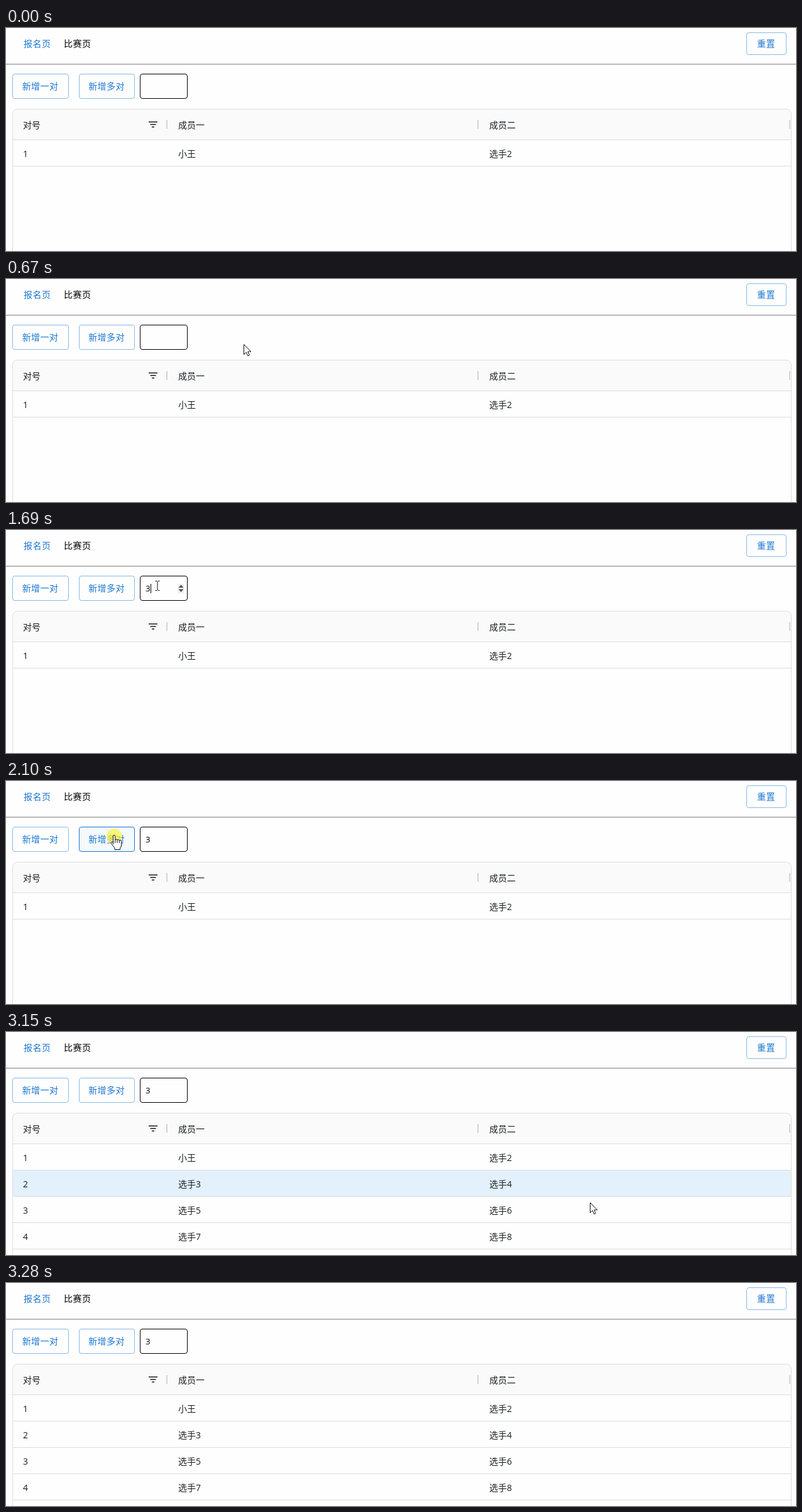
An HTML page for the animation above (3810 ms loop, 1257 by 356 pixels).

```html
<!DOCTYPE html>
<html lang="zh-CN">
<head>
<meta charset="utf-8">
<style>
  html, body { margin: 0; width: 100%; height: 100%; overflow: hidden; background: #fefefe; }
  svg { display: block; font: 14px "Open Sans", "Noto Sans CJK SC", "Noto Sans CJK", sans-serif; }
  .button text { fill: #1976d2; letter-spacing: .4px; }
  .button rect { fill: #fefefe; stroke: #1976d280; }
  .button.hover rect { fill: #f4f9fd; stroke: #1976d2; }
  .nav { letter-spacing: .5px; }
  .line { fill: #dcdddd; }
  .pointer { fill: #fff; stroke: #111; }
</style>
</head>
<body>
<svg width="1257" height="356" viewBox="0 0 1257 356">
  <defs><clipPath id="clip"><rect x="116" y="73" width="89" height="40" rx="4"/></clipPath></defs>
  <text class="nav" x="28" y="30" fill="#1976d2">报名页</text>
  <text class="nav" x="92" y="30">比赛页</text>
  <path d="M0 57.5H1257" stroke="#a0a0a0"/>
  <path d="M0 58.5H1257" stroke="#d4d4d4"/>
  <g id="buttons"></g>
  <circle id="ripple" cx="172" cy="88" fill="#1976d2" clip-path="url(#clip)"/>
  <rect x="213.5" y="73.5" width="75" height="39" rx="3.5" fill="#fefefe" stroke="#000"/>
  <text id="digit" x="222" y="98" font-size="13.33">3</text>
  <path id="caret" d="M0 86V101" stroke="#000"/>
  <g id="spinner">
    <path d="M273 86h10v15h-10z" fill="#efefef"/>
    <path d="M274.5 92l4-4.5 4 4.5zM274.5 94.5l4 4.5 4-4.5z" fill="#505050"/>
  </g>
  <path d="M11 179V137q0-7 7-7H1242q7 0 7 7V179z" fill="#fafafa"/>
  <rect class="line" x="11" y="178" width="1238" height="1"/>
  <text y="160" fill="#181d1f"><tspan x="27">对号</tspan><tspan x="274">成员一</tspan><tspan x="769">成员二</tspan></text>
  <path d="M227 150h14M229.5 154h9M232 158h4" stroke="#181d1f" stroke-width="1.5"/>
  <path d="M256 147v14M751 147v14M1247 147v14" stroke="#d3d4d4" stroke-width="2"/>
  <g id="rows"></g>
  <rect x="10.5" y="129.5" width="1239" height="300" rx="8" fill="none" stroke="#dcdddd"/>
  <circle id="click" r="12.3" cy="88.5" fill="#fff22e" opacity=".65"/>
  <g id="cursor">
    <path id="arrow" class="pointer" d="M.5.5V16.5L4.3 13 6.8 18.7 9.3 17.6 6.8 12H11.8z"/>
    <path id="beam" d="M-3.5-7.5H-1L0-6.5 1-7.5H3.5M0-6.5V6.5M-3.5 7.5H-1L0 6.5 1 7.5H3.5" fill="none" stroke="#111"/>
    <g id="hand" transform="translate(0 -1)">
      <path class="pointer" d="M-1.5 14V1Q-1.5-.8 0-.8T1.7 1V7.5Q1.7 6 3.3 6T5 7.8Q5 6.5 6.6 6.5T8.3 8.5Q8.3 7.5 9.8 7.5T11.5 9.5V16Q11.5 18 9.5 20V22.5H1V20L-4.5 13Q-5.5 11-4 10.3T-1.5 12z"/>
      <path d="M1.7 7.5V12M5 8V12M8.3 8.5V12" stroke="#111"/>
    </g>
  </g>
</svg>
<script>
const LOOP = 3810, STEP = 70;
const ENTER = 530, FOCUS = 1090, TYPE = 1620, PRESS = 2100, ADD = 2310, LEAVE = 3280;
const ROW_TOP = 179, ROW_HEIGHT = 42;
const $ = id => document.getElementById(id);
const show = (id, on) => { $(id).style.display = on ? '' : 'none'; };
const ease = u => u * u * (3 - 2 * u);

// Turning points of the pointer
const stops = [
  { at: ENTER, x: 418, y: 328 },
  { at: 670, x: 378, y: 104 },
  { at: 950, x: 247, y: 89 },
  { at: TYPE, x: 247, y: 89 },
  { at: 2030, x: 172, y: 88 },
  { at: 2720, x: 172, y: 88 },
  { at: 3080, x: 888, y: 152 },
  { at: 3150, x: 929, y: 272 },
  { at: 3220, x: 938, y: 336 }
];

// The pointer advances in small hops, as in a screen recording
function pointerAt(t) {
  const i = stops.findLastIndex(s => s.at <= t);
  const a = stops[i], b = stops[i + 1] || a;
  const hops = Math.floor((t - a.at) / STEP) * STEP;
  const u = b === a ? 0 : ease(hops / (b.at - a.at));
  return { x: a.x + (b.x - a.x) * u, y: a.y + (b.y - a.y) * u };
}

const button = (x, y, w, h, label) => `<g class="button">
  <rect x="${x + .5}" y="${y + .5}" width="${w - 1}" height="${h - 1}" rx="3.5"/>
  <text x="${x + (w - 14.4 * label.length) / 2 - .5}" y="${y + h / 2 + 5}">${label}</text></g>`;
$('buttons').innerHTML = button(10, 73, 90, 40, '新增一对') +
  button(116, 73, 89, 40, '新增多对') + button(1178, 7, 64, 36, '重置');
const addMany = $('buttons').children[1];

const row = n => {
  const y = ROW_TOP + ROW_HEIGHT * (n - 1);
  const first = n === 1 ? '小王' : '选手' + (2 * n - 1);
  return `<g><rect x="11" y="${y}" width="1238" height="41"/>
    <rect class="line" x="11" y="${y + 41}" width="1238" height="1"/>
    <text y="${y + 27}" fill="#181d1f"><tspan x="27">${n}</tspan><tspan x="274">${first}</tspan><tspan x="769">选手${2 * n}</tspan></text></g>`;
};
$('rows').innerHTML = [1, 2, 3, 4].map(row).join('');
const rows = [...$('rows').children];

function draw(t) {
  const active = t >= ENTER && t < LEAVE;
  const { x, y } = active ? pointerAt(t) : { x: -99, y: -99 };
  const inBar = y > 73 && y < 113;
  const onInput = inBar && x >= 213 && x < 289;
  const onButton = inBar && x >= 116 && x < 205;
  const focused = t >= FOCUS && t < PRESS;
  const typed = t >= TYPE;

  show('cursor', active);
  $('cursor').setAttribute('transform', `translate(${Math.round(x)} ${Math.round(y)})`);
  show('beam', onInput);
  show('hand', onButton);
  show('arrow', !onInput && !onButton);
  addMany.classList.toggle('hover', onButton);

  show('digit', typed);
  show('caret', focused);
  $('caret').setAttribute('transform', `translate(${typed ? 230.5 : 222.5})`);
  show('spinner', onInput || focused);

  const clicked = start => t >= start && t < start + STEP;
  show('click', clicked(FOCUS) || clicked(PRESS));
  $('click').setAttribute('cx', typed ? 172 : 245.5);

  const k = (t - PRESS) / 550;
  show('ripple', t >= PRESS + STEP && k < 1);
  $('ripple').setAttribute('r', 60 * Math.sqrt(Math.max(0, k)));
  $('ripple').setAttribute('opacity', .25 * Math.max(0, 1 - k));

  // The row highlight trails slightly behind the pointer
  const hovered = Math.floor((y - 10 - ROW_TOP) / ROW_HEIGHT);
  rows.forEach((el, i) => {
    el.style.display = i === 0 || t >= ADD ? '' : 'none';
    el.firstElementChild.setAttribute('fill', hovered === i ? '#e3f1fd' : '#fefefe');
  });
}

const start = performance.now();
function tick() {
  draw((performance.now() - start) % LOOP);
  requestAnimationFrame(tick);
}
tick();
</script>
</body>
</html>
```
